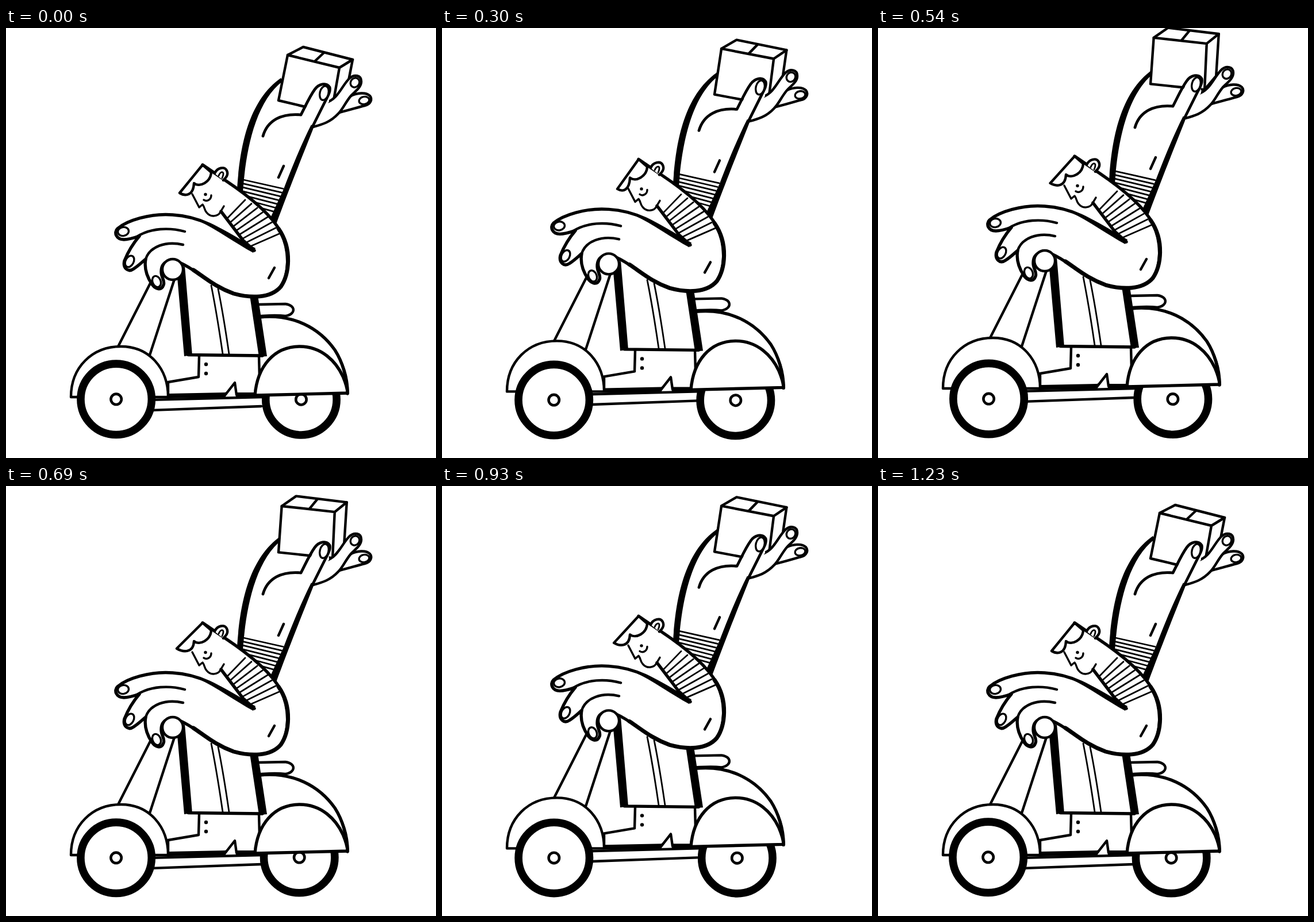
Animation of 748 by 748 pixels, one loop 1260 ms. Source, as an HTML page:

```html
<!DOCTYPE html>
<html lang="en">
<head>
<meta charset="utf-8">
<title>Scooter delivery</title>
<style>
  html, body { margin: 0; width: 100%; height: 100%; overflow: hidden; background: #fff; }
  svg { display: block; width: 100vw; height: 100vh; }
  path, circle, ellipse { fill: #fff; stroke: #000; stroke-width: 4.4; stroke-linecap: round; stroke-linejoin: round; }
  ellipse { stroke-width: 3.4; }
  .line { fill: none; }
  .thin { fill: none; stroke-width: 2.8; }
  .bold { stroke-width: 5.4; }
  .heavy { fill: none; stroke-width: 7; }
  .blank { stroke: none; }
  .ink { fill: #000; stroke: none; }
  .tyre { stroke-width: 13.6; }
</style>
</head>
<body>
<svg viewBox="0 0 748 748">
  <defs>
    <g id="wheel">
      <circle class="tyre" r="61.7"/>
      <circle r="9.2" style="stroke-width:4.6"/>
    </g>
  </defs>

  <use href="#wheel" id="rear"/>

  <g id="body">
    <!-- footboard and shoe -->
    <path class="line" d="M250 647L446 642M250 665L444 658"/>
    <path class="line" d="M336 570L335 607L282 616V640M440 570L441 608M380 640L398 617L401 638"/>
    <path class="ink" d="M283 636L381 634L386 632L381 643L283 644ZM399 634H433V642L400 643Z"/>
    <circle class="ink" cx="348" cy="585" r="3.2"/>
    <circle class="ink" cx="348" cy="601" r="3.2"/>

    <!-- seat and rear shell -->
    <path d="M437 481L486 480C504 482 505 498 486 501C470 499 460 500 441 501"/>
    <path class="bold" d="M441 503C500 497 545 522 572 560C586 582 593 610 594 636"/>
    <path class="bold" d="M433 639C437 589 466 554 511 554C549 554 574 580 586 606C591 618 594 628 594 635Z"/>
    <path class="ink" d="M572 558C588 580 597 606 597 637L592 634C591 606 584 582 572 558Z"/>

    <!-- trousers -->
    <path class="bold" d="M306 425L317 568.5L446 570L431 460"/>
    <path class="ink" d="M298 434L311 414L324 569L310 571ZM424 465L438 465L454 571L440 572Z"/>
    <path class="thin" d="M357 448Q367 498 377 567M369 454Q378 498 388 567"/>

    <!-- steering column and mudguard -->
    <path d="M253 440L194 556L250 569L294 434"/>
    <path d="M113 642C113 590 150 554 200 554C250 554 282 593 282 642Z"/>

    <!-- raised arm -->
    <path class="blank" d="M407 284C412 222 424 130 480 90L550 140L468 338Z"/>
    <path class="ink" d="M402 280C406 220 417 130 478 87L482 92C431 130 416 222 412 288Z"/>
    <path class="ink" d="M461 328L483 280C499 238 514 202 531 168L536 171C520 212 497 268 470 341Z"/>
    <g id="cuff"></g>
    <path class="line" d="M474 260L483 240"/>

    <g id="box">
      <path d="M490 47L517 33L603 55L589 127L566 148L474 126Z"/>
      <path class="line" d="M490 47L580 69L603 55M580 69L566 148M537 58L553 43"/>
    </g>

    <!-- raised hand -->
    <path d="M580 147C596 143 612 138 624 135C634 133 638 124 633 118C626 111 610 113 600 118"/>
    <path d="M556 130C578 124 584 100 598 87C606 80 618 82 618 93C618 104 606 111 600 118C590 130 586 141 578 149C564 164 550 168 534 172"/>
    <path class="blank" d="M514 153L540 106L560 104L562 128L534 171Z"/>
    <path class="line" style="stroke-width:4.8" d="M447 188C455 160 480 148 513 151C520 138 527 121 537 107C544 97 557 94 563 103C565 110 560 118 556 126L533 172"/>
    <ellipse cx="553.5" cy="113" rx="7.5" ry="12.5" transform="rotate(14 553 113)"/>
    <ellipse cx="607" cy="95" rx="7.5" ry="8.5" transform="rotate(35 607 95)"/>
    <ellipse cx="623" cy="126" rx="9" ry="6.5" transform="rotate(-12 623 126)"/>

    <!-- back, lower arm and hand -->
    <path class="bold" d="M342 238L380 264C425 294 462 325 478 355C495 390 492 430 478 450C460 471 425 470 396 462C352 447 335 422 302 408C290 400 270 404 270 424C270 434 277 440 274 447C270 458 260 454 254 446C246 434 240 418 243 402C236 408 230 414 222 419C212 426 203 417 206 405C212 390 220 376 232 362C220 366 212 368 205 368C192 368 187 356 194 349C210 335 250 322 290 325C340 328 370 348 432 387L412 369L374 319"/>
    <path class="heavy" d="M474 349C499 385 492 430 478 450C460 471 425 470 396 462C365 451 346 434 326 421"/>
    <path class="ink" d="M330 333C375 343 405 368 434 383L430 391C400 375 370 352 330 333Z"/>
    <path class="line" d="M226 364C252 347 285 347 311 354M243 402C250 380 278 370 308 377"/>
    <path class="line" d="M457 435L467 417"/>
    <ellipse cx="204" cy="354" rx="9.5" ry="7.5" transform="rotate(-10 204 354)"/>
    <ellipse cx="215" cy="406" rx="7" ry="10.5" transform="rotate(28 215 406)"/>
    <ellipse cx="262" cy="441" rx="7" ry="10" transform="rotate(-22 262 441)"/>
    <g id="collar"></g>
    <circle cx="290" cy="420" r="18"/>

    <!-- head -->
    <path d="M363 253C367 243 380 240 384 248C388 256 381 262 378 265"/>
    <path class="thin" d="M370 257C373 248 382 248 376 261"/>
    <path class="line" style="stroke-width:3.4" d="M324 289L336 312L342 307C346 312 345 317 349 321C356 330 369 328 373 320L379 310M344 299C350 303 357 298 357 291"/>
    <circle class="ink" cx="347" cy="289.5" r="2.7"/>
    <path id="hair"/>
  </g>

  <use href="#wheel" id="front"/>
</svg>

<script>
const LOOP = 1260, CYCLE = 1230, STEP = 30;
const $ = id => document.getElementById(id);

// Key poses: time, value
const lift = [[0, 0], [520, -15.5], [690, 0], [960, -12], [CYCLE, 0]];
const sway = [[0, 0], [300, 3], [690, -5], [CYCLE, 0]];

const ease = p => (1 - Math.cos(Math.PI * p)) / 2;

function sample(keys, t) {
  const i = keys.findIndex(k => k[0] > t);
  if (i < 0) return keys[keys.length - 1][1];
  const [t0, v0] = keys[i - 1], [t1, v1] = keys[i];
  return v0 + (v1 - v0) * ease((t - t0) / (t1 - t0));
}

function stripes(id, count, ends) {
  let d = '';
  for (let i = 0; i < count; i++) {
    const [x1, y1, x2, y2] = ends(i);
    d += `M${x1} ${y1}L${x2} ${y2}`;
  }
  $(id).innerHTML = `<path class="thin" d="${d}"/>`;
}

const quad = (a, b, c, u) => a * (1 - u) ** 2 + 2 * b * u * (1 - u) + c * u * u;

stripes('cuff', 7, i => [413 - i * 0.6, 264 + i * 6.6, 482 - i * 2.8, 279.5 + i * 6.6]);
stripes('collar', 8, i => {
  const u = i / 7;
  return [386 + 34 * u, 330 + 52 * u, quad(416, 456, 475, u), quad(299, 321, 358, u)];
});

// The wheels turn slightly off their axles
function placeWheel(id, x, y, deg) {
  const a = deg * Math.PI / 180;
  $(id).setAttribute('transform', `translate(${x + 1.7 * Math.cos(a)} ${y + 1.4 * Math.sin(a)})`);
}

function draw(t) {
  const p = t / CYCLE;
  $('body').setAttribute('transform', `translate(0 ${sample(lift, t)})`);

  const tip = sample(sway, t), x = 302 + tip, y = 287 + tip * 0.85;
  $('hair').setAttribute('d',
    `M342 238L${x} ${y}C${x + 10} ${y + 6} 326 292 327 270C337 278 356 268 357 251L342 238Z`);

  // The parcel tips back and hops off the palm
  const tilt = -7.8 * ease(2 * p) ** 1.4;
  const hop = -14.2 * ease(Math.max(0, 1 - Math.abs(t - 580) / 330));
  $('box').setAttribute('transform', `translate(0 ${hop}) rotate(${tilt} 474 126)`);

  placeWheel('front', 193.2, 646.4, 205 - 720 * p);
  placeWheel('rear', 511.8, 646.6, -15 - 900 * p);
}

const start = performance.now();
function tick(now) {
  const t = Math.max(0, now - start) % LOOP;
  draw(Math.floor(t / STEP) * STEP);
  requestAnimationFrame(tick);
}
draw(0);
requestAnimationFrame(tick);
</script>
</body>
</html>
```
